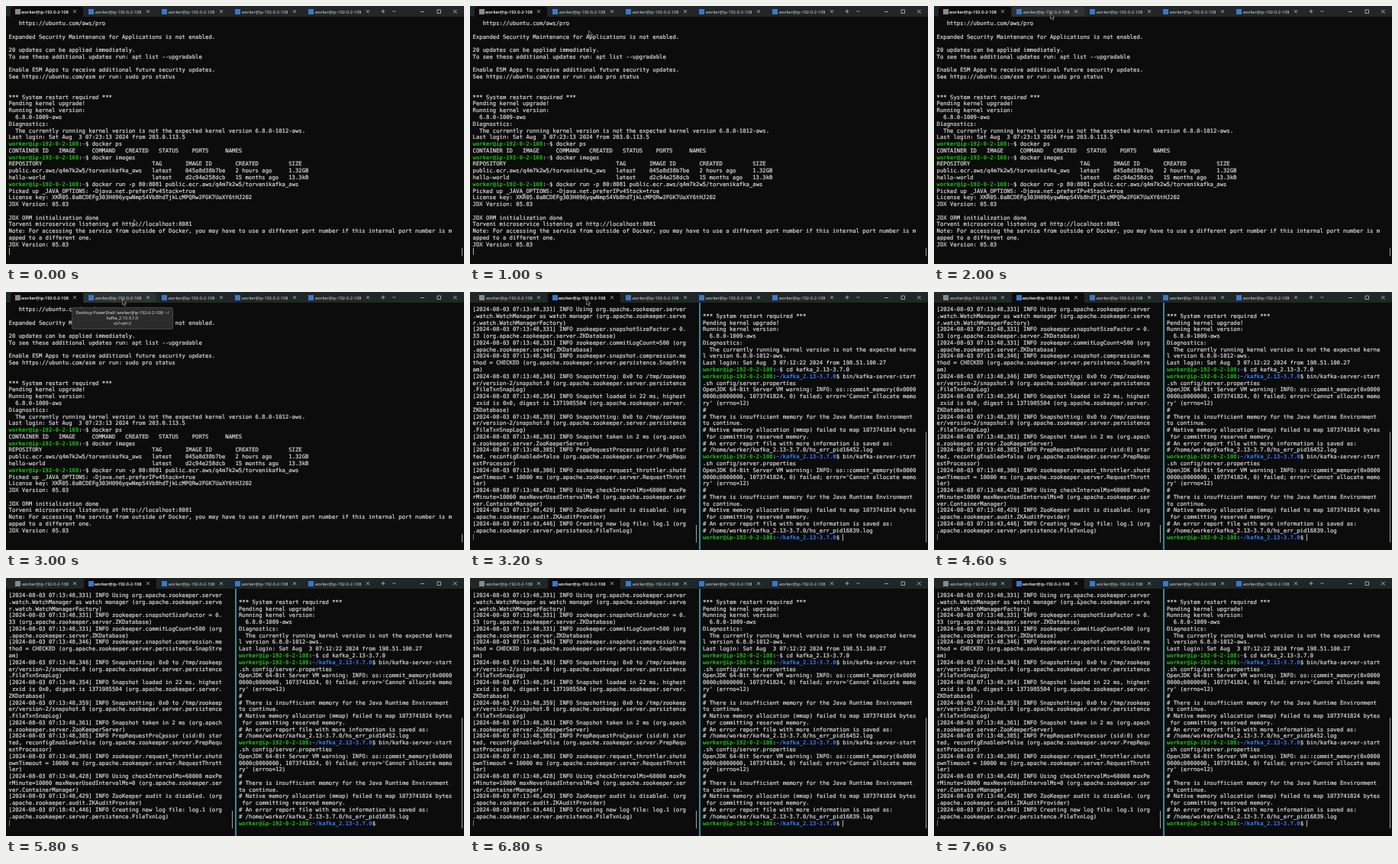
An HTML page for the animation above (8 s loop, 600x338 px).

```html
<!DOCTYPE html>
<html lang="en">
<head>
<meta charset="utf-8">
<title>Terminal session</title>
<style>
  html, body { margin: 0; width: 100%; height: 100%; overflow: hidden; background: #0c0c0c; }
  #stage { position: relative; width: 600px; height: 338px; overflow: hidden; background: #0c0c0c; }
  #stage * { position: absolute; }
  #bar { width: 600px; height: 14px; background: #212628; }
  .tab { top: 1px; width: 95px; height: 13px; border-radius: 3px 3px 0 0; color: #e0e0e0;
    font: 5.6px/14px "Open Sans", sans-serif; text-rendering: geometricPrecision; }
  .tab.hover { background: #2d3234; }
  .tab.active { background: #0c0c0c; color: #fff; font-weight: 600; }
  .tab i { left: 6px; top: 3px; width: 7px; height: 7px; background: #3c78c8; }
  .tab:first-child i { background: #8a8a8a; }
  .tab span { left: 15px; width: 65px; overflow: hidden; white-space: nowrap; }
  .tab.active span { left: 14px; width: 62px; }
  svg { left: 0; top: 0; fill: none; stroke: #d8d8d8; stroke-width: .7; }
  pre { top: 19px; margin: 0; color: #dadada; font: 7.265px/8.775px "DejaVu Sans Mono", monospace;
    text-rendering: geometricPrecision; -webkit-text-stroke: .2px; }
  #stage pre * { position: static; }
  pre b { color: #16c60c; -webkit-text-stroke: 0; }
  pre b.path { color: #3b78ff; }
  #tip { left: 86px; top: 20px; width: 133px; height: 29px; box-sizing: border-box; padding-top: 3px;
    border: .5px solid #454545; border-radius: 2px; background: #2c2c2c; color: #f0f0f0; text-align: center;
    font: 5.5px/7.1px "Open Sans", sans-serif; text-rendering: geometricPrecision; }
  #stage #tip * { position: static; }
  #caret { top: 317px; width: 1px; height: 9px; background: #b0b0b0; }
  #mouse { stroke: #bbb; stroke-width: .6; }
</style>
</head>
<body>
<div id="stage">
  <div id="first"></div>
  <div id="split"></div>
  <div id="bar"></div>
  <svg width="600" height="14">
    <path d="M491.5 7h5M494 4.500v5M506.500 6l2 2 2-2M543 7.500h5M565 5h4.500v4.500h-4.500zM586 4.800l4.800 4.800M590.800 4.800l-4.800 4.800"/>
    <path id="closers"/>
  </svg>
  <div id="tip">Desktop PowerShell: worker@ip-192-0-2-108: ~/<br>kafka_2.13-3.7.0<br><em>ctrl+alt+2</em></div>
  <div id="caret"></div>
  <svg id="mouse" width="8" height="11"><path d="M.5.5v7.300l1.700-1.500 1.300 3 1.300-.6-1.300-2.800h2.300z" fill="#111"/></svg>
</div>
<script>
const $ = id => document.getElementById(id);
const HOST = 'worker@ip-192-0-2-108', KAFKA = '~/kafka_2.13-3.7.0';
const IMAGE = 'public.ecr.aws/q4m7k2w5/torvenikafka_aws';
const LOOP = 8000, STEP = 200;

const restart = `*** System restart required ***
Pending kernel upgrade!
Running kernel version:
  6.8.0-1009-aws
Diagnostics:
  The currently running kernel version is not the expected kernel version 6.8.0-1012-aws.
`;

const dockerText = `   https://ubuntu.com/aws/pro

Expanded Security Maintenance for Applications is not enabled.

20 updates can be applied immediately.
To see these additional updates run: apt list --upgradable

Enable ESM Apps to receive additional future security updates.
See https://ubuntu.com/esm or run: sudo pro status


${restart}Last login: Sat Aug  3 07:23:13 2024 from 203.0.113.5
${HOST}:~$ docker ps
CONTAINER ID   IMAGE     COMMAND   CREATED   STATUS    PORTS     NAMES
${HOST}:~$ docker images
REPOSITORY                                 TAG       IMAGE ID       CREATED         SIZE
${IMAGE}   latest    045a8d38b7be   2 hours ago     1.32GB
hello-world                                latest    d2c94e258dcb   15 months ago   13.3kB
${HOST}:~$ docker run -p 80:8081 ${IMAGE}
Picked up _JAVA_OPTIONS: -Djava.net.preferIPv4Stack=true
License key: XKR05.0aBCDEFg303H096yqwNmpS4Vb8hdTjkLcMPQRw2FGK7UaXY6tHJ202
JDX Version: 05.03

JDX ORM initialization done
Torveni microservice listening at http://localhost:8081
Note: For accessing the service from outside of Docker, you may have to use a different port number if this internal port number is mapped to a different one.
JDX Version: 05.03`;

const pkg = 'org.apache.zookeeper.';
const snapshot = `Snapshotting: 0x0 to /tmp/zookeeper/version-2/snapshot.0 (${pkg}server.persistence.FileTxnSnapLog)`;
const zooText = [
  ['13:48,331', `Using ${pkg}server.watch.WatchManager as watch manager (${pkg}server.watch.WatchManagerFactory)`],
  ['13:48,331', `zookeeper.snapshotSizeFactor = 0.33 (${pkg}server.ZKDatabase)`],
  ['13:48,331', `zookeeper.commitLogCount=500 (${pkg}server.ZKDatabase)`],
  ['13:48,346', `zookeeper.snapshot.compression.method = CHECKED (${pkg}server.persistence.SnapStream)`],
  ['13:48,346', snapshot],
  ['13:48,354', `Snapshot loaded in 22 ms, highest zxid is 0x0, digest is 1371985504 (${pkg}server.ZKDatabase)`],
  ['13:48,359', snapshot],
  ['13:48,361', `Snapshot taken in 2 ms (${pkg}server.ZooKeeperServer)`],
  ['13:48,385', `PrepRequestProcessor (sid:0) started, reconfigEnabled=false (${pkg}server.PrepRequestProcessor)`],
  ['13:48,386', `zookeeper.request_throttler.shutdownTimeout = 10000 ms (${pkg}server.RequestThrottler)`],
  ['13:48,428', `Using checkIntervalMs=60000 maxPerMinute=10000 maxNeverUsedIntervalMs=0 (${pkg}server.ContainerManager)`],
  ['13:48,429', `ZooKeeper audit is disabled. (${pkg}audit.ZKAuditProvider)`],
  ['18:43,446', `Creating new log file: log.1 (${pkg}server.persistence.FileTxnLog)`],
].map(([time, text]) => `[2024-08-03 07:${time}] INFO ${text}`).join('\n');

const failedStart = pid => `${HOST}:${KAFKA}$ bin/kafka-server-start.sh config/server.properties
OpenJDK 64-Bit Server VM warning: INFO: os::commit_memory(0x00000000c0000000, 1073741824, 0) failed; error='Cannot allocate memory' (errno=12)
#
# There is insufficient memory for the Java Runtime Environment to continue.
# Native memory allocation (mmap) failed to map 1073741824 bytes for committing reserved memory.
# An error report file with more information is saved as:
# /home/worker/kafka_2.13-3.7.0/hs_err_pid${pid}.log
`;
// The leading newline is doubled because the parser drops the first one in a pre.
const kafkaText = `\n\n${restart}Last login: Sat Aug  3 07:12:22 2024 from 198.51.100.27
${HOST}:~$ cd kafka_2.13-3.7.0
${failedStart(16452)}${failedStart(16839)}${HOST}:${KAFKA}$`;

function pane(text, left, columns) {
  const html = text
    .replace(new RegExp(`.{${columns}}(?=.)`, 'g'), '$&\n')
    .replace(/^(worker@[\w-]+):(~[^$\n]*)\$/gm, '<b>$1</b>:<b class="path">$2</b>$');
  return `<pre style="left:${left}px">${html}</pre>`;
}
const block = (x, y, w, h, color = '#a0a0a0') =>
  `<div style="left:${x}px;top:${y}px;width:${w}px;height:${h}px;background:${color}"></div>`;

$('first').innerHTML = pane(dockerText, 3.6, 133) + block(597, 317, 1, 11);
$('split').innerHTML = pane(zooText, 3.6, 64) + pane(kafkaText, 305, 64)
  + block(300, 14, 2, 324, '#3c8a90') + block(296, 305, 1, 23) + block(597, 183, 1, 145)
  + block(4, 317, 1, 8, '#707070');

const tabX = [6, 101.5, 197.5, 293.5, 389.5];
$('bar').innerHTML = tabX.map(x => `<div class="tab" style="left:${x}px"><i></i><span>${HOST}</span></div>`).join('');
$('closers').setAttribute('d', tabX.map((x, i) => `M${88 + 96 * i} 5.2l4 4m0-4l-4 4`).join(''));
const tabs = document.querySelectorAll('.tab');

// Pointer tip: time, x, y
const path = [[0, 167, 279], [1200, 154, 12], [1400, 152, 9], [3400, 152, 9], [4600, 178, 109],
  [5600, 178, 109], [5800, 201, 202], [7200, 201, 202], [7600, 189, 26], [LOOP, 189, 26]];
// Caret toggles, starting visible
const blinks = [400, 1000, 1400, 3200, 3800, 4400, 5800, 6800, 7400, 7600];

function pointer(t) {
  const i = path.findIndex(p => p[0] > t);
  const [t0, x0, y0] = path[i - 1], [t1, x1, y1] = path[i];
  const u = (t - t0) / (t1 - t0), e = u * u * (3 - 2 * u);
  return [x0 + (x1 - x0) * e, y0 + (y1 - y0) * e];
}

function draw(now) {
  const t = Math.floor(now % LOOP / STEP) * STEP;
  const second = t >= 3200;
  const [x, y] = pointer(t);
  $('first').style.display = second ? 'none' : '';
  $('split').style.display = second ? '' : 'none';
  tabs.forEach((tab, i) => {
    tab.classList.toggle('active', i === +second);
    tab.classList.toggle('hover', i === 1 && !second && y < 14);
  });
  $('tip').style.opacity = second || t < 2400 ? 0 : t < 2600 ? .6 : 1;
  $('mouse').style.transform = `translate(${x}px, ${y}px)`;
  $('caret').style.left = second ? '488px' : '4px';
  $('caret').style.opacity = blinks.filter(b => b <= t).length % 2 ? 0 : 1;
  requestAnimationFrame(() => draw(performance.now() - start));
}
const start = performance.now();
draw(0);
</script>
</body>
</html>
```
